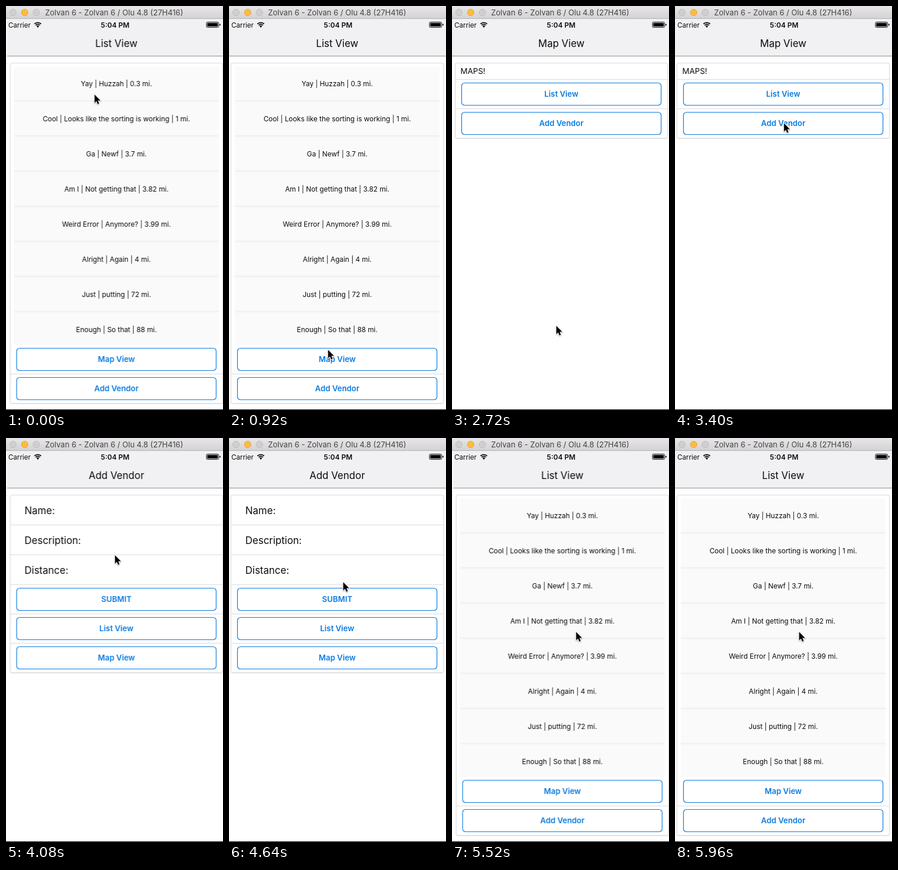
Write an HTML page with a canvas that moves like this. It is 372 px wide and 690 px high and loops after 6 s.

```html
<!DOCTYPE html>
<html lang="en">
<head>
<meta charset="utf-8">
<title>Vendor list</title>
<style>
  html, body { margin: 0; width: 100%; height: 100%; overflow: hidden; background: #fff; }
  canvas { display: block; width: 372px; height: 690px; }
</style>
</head>
<body>
<canvas id="stage"></canvas>
<script>
const W = 372, H = 690, LOOP = 6000, STEP = 40;
const SCREEN = { x: -2, y: 22, w: 375, h: 667 };
const MID = SCREEN.x + SCREEN.w / 2;
const BLUE = '#0a7be0', INK = '#0c0c0c', RULE = '#dcdcdc';
const dpr = window.devicePixelRatio || 1;

function makeCanvas(el, w, h) {
  el.width = Math.round(w * dpr);
  el.height = Math.round(h * dpr);
  return el.getContext('2d');
}

const ctx = makeCanvas(document.getElementById('stage'), W, H);
const layer = document.createElement('canvas');
const pg = makeCanvas(layer, SCREEN.w, SCREEN.h);

function text(c, str, x, y, size, { weight = 400, color = INK, align = 'center' } = {}) {
  c.font = `${weight} ${size}px Inter, "Liberation Sans", sans-serif`;
  c.textAlign = align;
  c.fillStyle = color;
  c.fillText(str, x, y + size * 0.364);
}

function rect(c, x, y, w, h, color) {
  c.fillStyle = color;
  c.fillRect(x, y, w, h);
}

function roundPath(c, x, y, w, h, r) {
  c.beginPath();
  c.moveTo(x + r, y);
  c.arcTo(x + w, y, x + w, y + h, r);
  c.arcTo(x + w, y + h, x, y + h, r);
  c.arcTo(x, y + h, x, y, r);
  c.arcTo(x, y, x + w, y, r);
  c.closePath();
}

// ---- pages ----
function card(bottom, rules) {
  pg.save();
  pg.shadowColor = 'rgba(0,0,0,0.16)';
  pg.shadowBlur = 2 * dpr;
  pg.shadowOffsetY = dpr;
  roundPath(pg, 3.5, 97.5, 364, bottom - 97.5, 2);
  pg.fillStyle = '#fff';
  pg.fill();
  pg.restore();
  pg.lineWidth = 1;
  pg.strokeStyle = RULE;
  pg.stroke();
  rules.forEach(y => rect(pg, 4, y, 363, 1, RULE));
}

function button(label, y, pressed) {
  pg.save();
  pg.globalAlpha = label === pressed.label ? pressed.alpha : 1;
  roundPath(pg, 14.5, y + 0.5, 342, 38, 5);
  pg.lineWidth = 1.2;
  pg.strokeStyle = BLUE;
  pg.stroke();
  text(pg, label, MID, y + 19.5, 13.3, { weight: 600, color: BLUE });
  pg.restore();
}

const vendors = [
  'Yay | Huzzah | 0.3 mi.',
  'Cool | Looks like the sorting is working | 1 mi.',
  'Ga | Newf | 3.7 mi.',
  'Am I | Not getting that | 3.82 mi.',
  'Weird Error | Anymore? | 3.99 mi.',
  'Alright | Again | 4 mi.',
  'Just | putting | 72 mi.',
  'Enough | So that | 88 mi.'
];

const pages = {
  'List View'(pressed) {
    card(678.5, [628]);
    rect(pg, 10, 103, 351, 476, '#fafafa');
    vendors.forEach((v, i) => {
      const y = 133 + 60 * i;
      if (i < vendors.length - 1) {
        rect(pg, 10, y + 27, 351, 4, '#f6f6f6');
        rect(pg, 10, y + 28, 351, 2, '#f1f1f1');
      }
      text(pg, v, MID, y, 11.9);
    });
    button('Map View', 584, pressed);
    button('Add Vendor', 634, pressed);
  },
  'Map View'(pressed) {
    card(225.5, [125, 175]);
    text(pg, 'MAPS!', 12.5, 111.5, 13.5, { align: 'left' });
    button('List View', 131, pressed);
    button('Add Vendor', 181, pressed);
  },
  'Add Vendor'(pressed) {
    card(400.5, [148, 199, 250, 300, 350]);
    ['Name:', 'Description:', 'Distance:'].forEach((s, i) =>
      text(pg, s, 28, 124 + 51 * i, 17, { align: 'left' }));
    button('SUBMIT', 256, pressed);
    button('List View', 306, pressed);
    button('Map View', 356, pressed);
  }
};

function renderPage(title, pressed) {
  pg.setTransform(dpr, 0, 0, dpr, -SCREEN.x * dpr, -SCREEN.y * dpr);
  rect(pg, SCREEN.x, SCREEN.y, SCREEN.w, SCREEN.h, '#fff');
  rect(pg, SCREEN.x, 22, SCREEN.w, 63, '#f1f1f3');
  rect(pg, SCREEN.x, 85, SCREEN.w, 1, '#8e8e90');
  text(pg, title, MID, 63.5, 17);
  pages[title](pressed);
}

// ---- navigation stack: each page is pushed over the one before ----
const stack = [
  { title: 'Map View', at: -Infinity },
  { title: 'List View', at: -359 },
  { title: 'Map View', at: 2322 },
  { title: 'Add Vendor', at: 3721 },
  { title: 'List View', at: 5160 }
];

// critically damped spring
function spring(ms) {
  if (ms <= 0) return 0;
  const x = 0.0185 * ms, rest = (1 + x) * Math.exp(-x);
  return rest < 0.001 ? 1 : 1 - rest;
}

function pressAlpha(ms) {
  if (ms < -60) return 1;
  const k = Math.min(1, Math.max(0, (ms - 110) / 150));
  return 0.2 + 0.8 * k * k * (3 - 2 * k);
}

function drawStack(t) {
  const pos = stack.slice(1).reduce((sum, s) => sum + spring(t - s.at), 0);
  stack.forEach((s, i) => {
    const d = pos - i;
    const alpha = d > 0 ? 1 - 0.7 * d : 1;
    if (d <= -1 || alpha <= 0) return;
    const next = stack[i + 1];
    const pressed = next ? { label: next.title, alpha: pressAlpha(t - next.at) } : {};
    renderPage(s.title, pressed);
    const shift = d < 0 ? -d * SCREEN.w : -10 * d;
    const scale = d > 0 ? 1 - 0.05 * d : 1;
    const w = SCREEN.w * scale, h = SCREEN.h * scale;
    ctx.globalAlpha = alpha;
    ctx.drawImage(layer, MID + shift - w / 2, SCREEN.y + (SCREEN.h - h) / 2, w, h);
    ctx.globalAlpha = 1;
  });
}

// ---- fixed chrome ----
function drawTitleBar() {
  const g = ctx.createLinearGradient(0, 0, 0, 21);
  g.addColorStop(0, '#e8e6e8');
  g.addColorStop(1, '#d4d2d4');
  rect(ctx, 0, 0, W, 22, g);
  rect(ctx, 0, 21, W, 1, '#b4b2b4');
  [['#d0ced0', '#b9b7b9'], ['#fdbb3f', '#dfa032'], ['#d0ced0', '#b9b7b9']].forEach(([fill, line], i) => {
    ctx.beginPath();
    ctx.arc(12 + 20 * i, 11, 5.6, 0, Math.PI * 2);
    ctx.fillStyle = fill;
    ctx.fill();
    ctx.lineWidth = 0.8;
    ctx.strokeStyle = line;
    ctx.stroke();
  });
  text(ctx, 'Zolvan 6 - Zolvan 6 / Olu 4.8 (27H416)', 67, 11.5, 13.1, { color: '#444', align: 'left' });
}

function drawStatusBar() {
  text(ctx, 'Carrier', 4, 32.5, 11.7, { align: 'left' });
  text(ctx, '5:04 PM', 187, 32.5, 12, { weight: 600 });
  ctx.strokeStyle = ctx.fillStyle = '#000';
  ctx.lineWidth = 1.7;
  [5.2, 8.2].forEach(r => {
    ctx.beginPath();
    ctx.arc(54.5, 36.5, r, -Math.PI * 0.75, -Math.PI * 0.25);
    ctx.stroke();
  });
  ctx.beginPath();
  ctx.moveTo(54.5, 37);
  ctx.arc(54.5, 36.5, 3, -Math.PI * 0.75, -Math.PI * 0.25);
  ctx.fill();
  roundPath(ctx, 343.5, 27.5, 21, 9, 2);
  ctx.lineWidth = 1;
  ctx.stroke();
  rect(ctx, 345, 29, 18, 6, '#000');
  ctx.beginPath();
  ctx.arc(366, 32, 1.8, -Math.PI / 2, Math.PI / 2);
  ctx.fill();
}

// ---- pointer: time, x, y ----
const track = [
  [200, 152, 151], [880, 170, 587], [1000, 170, 587], [1400, 178, 602],
  [2560, 178, 602], [3240, 187, 200], [4400, 187, 200], [5000, 213, 331]
];

function pointerAt(t) {
  const i = track.findIndex(p => p[0] > t);
  if (i === 0) return track[0].slice(1);
  if (i < 0) return track[track.length - 1].slice(1);
  const [t0, x0, y0] = track[i - 1], [t1, x1, y1] = track[i];
  const k = (t - t0) / (t1 - t0), e = k * k * (3 - 2 * k);
  return [x0 + (x1 - x0) * e, y0 + (y1 - y0) * e];
}

const arrow = new Path2D('M0 0V14.2L3.2 11.2L5.3 16.2L7.8 15.2L5.7 10.3H10.2Z');

function drawPointer(t) {
  const [x, y] = pointerAt(t);
  ctx.save();
  ctx.translate(Math.round(x) - 0.2, Math.round(y) + 0.2);
  ctx.lineWidth = 1.8;
  ctx.lineJoin = 'round';
  ctx.strokeStyle = '#fff';
  ctx.shadowColor = 'rgba(0,0,0,0.35)';
  ctx.shadowBlur = 2 * dpr;
  ctx.shadowOffsetY = dpr;
  ctx.stroke(arrow);
  ctx.shadowColor = 'transparent';
  ctx.fillStyle = '#000';
  ctx.fill(arrow);
  ctx.restore();
}

function draw(t) {
  ctx.setTransform(dpr, 0, 0, dpr, 0, 0);
  rect(ctx, 0, 0, W, H, '#fff');
  drawStack(t);
  drawTitleBar();
  drawStatusBar();
  rect(ctx, 0, 689, W, 1, '#000');
  drawPointer(t);
}

const start = performance.now();
function tick() {
  const t = (performance.now() - start) % LOOP;
  draw(Math.floor(t / STEP) * STEP);
  requestAnimationFrame(tick);
}
tick();
</script>
</body>
</html>
```
